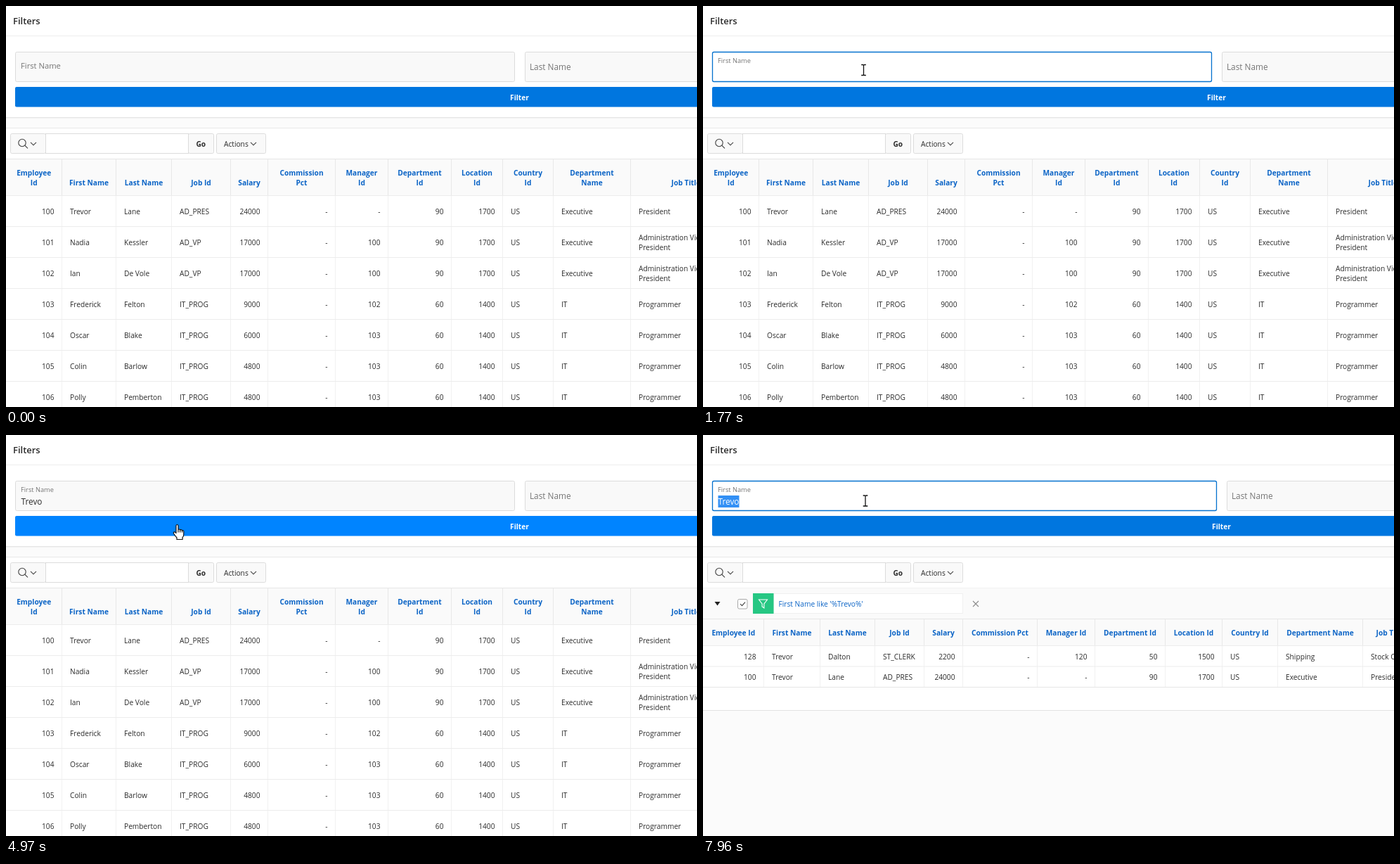
An HTML page for the animation above (8 s loop, 983 by 570 pixels).

```html
<!DOCTYPE html>
<html lang="en">
<head>
<meta charset="utf-8">
<title>Report filters</title>
<style>
  html, body { margin: 0; width: 100%; height: 100%; overflow: hidden; background: #fff; }
  svg { display: block; }
  text { font: 10.2px "Open Sans", "Noto Sans", sans-serif; fill: #2b2b2b; white-space: pre; }
  .bold { font-weight: 700; }
  .head { font-weight: 700; fill: #0b64c6; }
  .link { fill: #0b64c6; }
  .label { font-size: 11.8px; fill: #757575; }
  .value { font-size: 11.8px; }
  .icon { fill: none; stroke: #404040; stroke-width: 1.1; }
  .box { fill: #f9f9f9; stroke: #dcdcdc; }
</style>
</head>
<body>
<svg id="stage" width="983" height="570" viewBox="0 0 983 570"></svg>
<script>
const LOOP = 8000;
const RELOAD = 5750;
const WORD = "Trevo";
const KEY_TIMES = [2310, 2750, 2900, 3030, 3190];
const ALIGN = "RLLLRRRRRLLL";
const stage = document.getElementById("stage");

function add(parent, tag, attrs = {}, content = "") {
  const node = document.createElementNS("http://www.w3.org/2000/svg", tag);
  set(node, attrs);
  node.textContent = content;
  return parent.appendChild(node);
}
function set(node, attrs) {
  for (const name in attrs) node.setAttribute(name, attrs[name]);
}
const show = (node, on) => set(node, { visibility: on ? "visible" : "hidden" });
const group = parent => add(parent, "g");
const rect = (parent, x, y, width, height, attrs) =>
  add(parent, "rect", { x, y, width, height, ...attrs });
const path = (parent, d, attrs) => add(parent, "path", { d, ...attrs });
const line = (parent, d, stroke) => path(parent, d, { stroke, fill: "none" });
const label = (parent, x, y, content, cls = "", anchor = "start") =>
  add(parent, "text", { x, y, class: cls, "text-anchor": anchor }, content);

// Several lines of text, parted by "|"; y is the baseline of the last one.
function lines(parent, x, y, content, cls, anchor) {
  const parts = content.split("|");
  parts.forEach((part, i) =>
    label(parent, x, y - (parts.length - 1 - i) * 14.2, part, cls, anchor));
}

function table(parent, { edges, heads, top, headBottom, rowHeight, rows }) {
  const bottom = headBottom + rows.length * rowHeight;
  rect(parent, 0, top, 983, headBottom - top, { fill: "#fafafa" });
  line(parent, `M0 ${top}H983`, "#e6e6e6");
  edges.slice(0, -1).forEach(x => {
    line(parent, `M${x} ${top}V${headBottom}`, "#e8e8e8");
    line(parent, `M${x} ${headBottom}V${bottom}`, "#f1f1f1");
  });
  heads.forEach((head, i) => {
    const left = i ? edges[i - 1] : 0;
    lines(parent, (left + edges[i]) / 2, headBottom - 14.5, head, "head", "middle");
  });
  rows.forEach((row, r) => {
    const y = headBottom + r * rowHeight;
    const base = y + rowHeight / 2 + 4.5;
    line(parent, `M0 ${y}H983`, "#ececec");
    row.split(",").forEach((cell, i) => {
      const right = ALIGN[i] === "R";
      const x = right ? edges[i] - 11 : edges[i - 1] + 11.5;
      const drop = cell.includes("|") ? 7 : 0;
      lines(parent, x, base + drop, cell, "", right ? "end" : "start");
    });
  });
  line(parent, `M0 ${bottom}H983`, "#e6e6e6");
}

// Page frame
rect(stage, 0, 0, 983, 570, { fill: "#fff" });
label(stage, 10, 26, "Filters", "", "start").style.cssText = "font-size:13px;font-weight:600";
line(stage, "M0 42.5H983", "#eeeeee");
rect(stage, 0, 158, 983, 16, { fill: "#fbfbfb" });
line(stage, "M0 158.5H983", "#e4e4e4");
line(stage, "M0 159.5H983", "#f3f3f3");
line(stage, "M0 173.5H983", "#e8e8e8");

// Filter form
const field = rect(stage, 13.5, 65.5, 710, 42, { class: "box", rx: 2 });
const focusRing = rect(stage, 13.5, 65.5, 710, 42, { fill: "none", stroke: "#0572ce", rx: 2, "stroke-width": 1.3 });
const lastName = group(stage);
rect(lastName, 738.5, 65.5, 400, 42, { class: "box", rx: 2 });
label(lastName, 745, 90.7, "Last Name", "label");
const button = rect(stage, 13, 115, 1000, 28.5, { rx: 2 });
const buttonText = label(stage, 730.5, 133.7, "Filter", "bold", "middle");
buttonText.style.fill = "#fff";
const firstName = label(stage, 21, 90.7, "First Name", "label");
const selection = rect(stage, 21, 86, 30, 17, { fill: "#3390f5" });
const value = label(stage, 21.5, 98.6, "", "value");
const caret = rect(stage, 21, 86, 1, 16, { fill: "#111" });

// Toolbar
rect(stage, 6.5, 181.5, 50, 28, { class: "box", rx: 2 });
rect(stage, 56.5, 181.5, 203, 28, { fill: "#fff", stroke: "#dcdcdc" });
rect(stage, 259.5, 181.5, 36, 28, { class: "box", rx: 2 });
rect(stage, 299.5, 181.5, 70, 28, { class: "box", rx: 2 });
add(stage, "circle", { cx: 23, cy: 194.5, r: 5.2, class: "icon" });
path(stage, "M26.7 198.2L31 202.4M35 193.8l4 4 4-4M348 193.8l4 4 4-4", { class: "icon" });
label(stage, 277.3, 200, "Go", "bold", "middle");
label(stage, 310, 200, "Actions");

// Full report
const fullReport = group(stage);
table(fullReport, {
  edges: [79.5, 156.5, 235.5, 319.5, 372.5, 468.5, 543.5, 633.5, 706.5, 778.5, 888.5, 1046],
  heads: ["Employee|Id", "First Name", "Last Name", "Job Id", "Salary", "Commission|Pct",
    "Manager|Id", "Department|Id", "Location|Id", "Country|Id", "Department|Name", "Job Title"],
  top: 217.5, headBottom: 269.5, rowHeight: 44,
  rows: [
    "100,Trevor,Lane,AD_PRES,24000,-,-,90,1700,US,Executive,President",
    "101,Nadia,Kessler,AD_VP,17000,-,100,90,1700,US,Executive,Administration Vice|President",
    "102,Ian,De Vole,AD_VP,17000,-,100,90,1700,US,Executive,Administration Vice|President",
    "103,Frederick,Felton,IT_PROG,9000,-,102,60,1400,US,IT,Programmer",
    "104,Oscar,Blake,IT_PROG,6000,-,103,60,1400,US,IT,Programmer",
    "105,Colin,Barlow,IT_PROG,4800,-,103,60,1400,US,IT,Programmer",
    "106,Polly,Pemberton,IT_PROG,4800,-,103,60,1400,US,IT,Programmer"
  ]
});

// Filtered report
const filteredReport = group(stage);
rect(filteredReport, 0, 217, 983, 45, { fill: "#fafafa" });
line(filteredReport, "M0 217.5H983", "#f1f1f1");
path(filteredReport, "M16.5 237h8l-4 5.5z", { fill: "#222" });
rect(filteredReport, 49.5, 233.5, 13.5, 13.5, { fill: "#fff", stroke: "#a8a8a8", rx: 2 });
path(filteredReport, "M53 240.2l2.5 2.5 4.5-5", { class: "icon" });
rect(filteredReport, 100.5, 225.5, 269, 28, { fill: "#fff", stroke: "#f0f0f0" });
rect(filteredReport, 71, 225, 29.5, 29, { fill: "#26c783" });
path(filteredReport, "M79.5 234h12l-4.6 6v6l-2.8-2v-4z", { fill: "none", stroke: "#fff", "stroke-width": 1.1 });
label(filteredReport, 107.5, 244, `First Name like '%${WORD}%'`, "link");
path(filteredReport, "M384 236l8 8M392 236l-8 8", { stroke: "#8c8c8c", "stroke-width": 1.1 });
table(filteredReport, {
  edges: [86.5, 166.5, 244.5, 314.5, 369.5, 475.5, 557.5, 657.5, 738.5, 817.5, 938.5, 1018],
  heads: ["Employee Id", "First Name", "Last Name", "Job Id", "Salary", "Commission Pct",
    "Manager Id", "Department Id", "Location Id", "Country Id", "Department Name", "Job Title"],
  top: 261.5, headBottom: 299.5, rowHeight: 29.5,
  rows: [
    "128,Trevor,Dalton,ST_CLERK,2200,-,120,50,1500,US,Shipping,Stock Clerk",
    "100,Trevor,Lane,AD_PRES,24000,-,-,90,1700,US,Executive,President"
  ]
});
rect(filteredReport, 0, 391, 983, 179, { fill: "#fbfbfb" });
line(filteredReport, "M0 391.5H983", "#e2e2e2");

// Pointer
const pointer = group(stage);
const halo = add(pointer, "circle", { cx: -2, cy: -1, r: 13, fill: "#fff000", opacity: 0.6 });
const outline = { fill: "#fff", stroke: "#111", "stroke-width": 1.2, "stroke-linejoin": "round" };
const shapes = {
  beam: path(pointer, "M-3.3-7.5H-1.2Q0-7.5 0-6.3V6.3Q0 7.5-1.2 7.5H-3.3M3.3-7.5H1.2Q0-7.5 0-6.3M0 6.3Q0 7.5 1.2 7.5H3.3",
    { fill: "none", stroke: "#111", "stroke-width": 1.3 }),
  hand: path(pointer, "M-1.5 12V1.5Q-1.5 0 0 0T1.5 1.5V7Q3 5.8 4.2 7.4Q6 6.5 7 8.2Q9 7.6 9.3 9.6V14Q9.3 16.5 7.6 18V21H-.5V18.5Q-2.5 16.5-5 12.5Q-5.6 11-4.4 10.4Q-3 10-1.5 12ZM1.5 7V11M4.2 7.4V11M7 8.2V11",
    outline),
  arrow: path(pointer, "M0 0V16.5L3.8 13 6.3 18.8 8.7 17.7 6.2 12H11.5Z", outline)
};

// Steps: time, then values
const POINTER = [
  [0, 345, 600], [100, 345, 600], [1060, 225, 89], [1180, 225, 89], [1420, 228.5, 91],
  [3840, 228.5, 91], [4210, 249, 139.5], [4340, 243.5, 127.5], [6560, 243.5, 127.5],
  [6590, 243.5, 125], [7050, 230, 91], [7360, 230, 91], [7410, 230.5, 93],
  [7959, 230.5, 93], [7960, 231, 93.5]
];
const FLOAT = [[0, 0.22], [100, 0], [1170, 0], [1370, 1]];
const FOCUS = [[0, 0], [1170, 0], [1320, 1], [4750, 1], [4920, 0], [7560, 0], [7720, 1]];

function sample(steps, t) {
  const next = steps.findIndex(step => step[0] > t);
  if (next < 0) return steps[steps.length - 1].slice(1);
  const a = steps[next - 1], b = steps[next];
  const u = (t - a[0]) / (b[0] - a[0]);
  const k = u * u * (3 - 2 * u);
  return a.slice(1).map((v, i) => v + (b[i + 1] - v) * k);
}
const within = (t, ...spans) => spans.some(([from, to]) => t >= from && t < to);

function render(t) {
  const reloaded = t >= RELOAD;
  const shift = reloaded ? 7 : 0;
  show(fullReport, !reloaded);
  show(filteredReport, reloaded);
  set(lastName, { transform: `translate(${shift})` });
  set(buttonText, { x: 730.5 + shift });

  const active = within(t, [1110, 4750], [7560, LOOP]);
  set(field, { width: 710 + shift });
  field.style.fill = active ? "#fff" : "#f9f9f9";
  set(focusRing, { width: 710 + shift, opacity: sample(FOCUS, t)[0] });

  const [lift] = sample(FLOAT, t);
  set(firstName, { y: 90.7 - 9.8 * lift });
  firstName.style.fontSize = 11.8 - 2.55 * lift + "px";

  const typed = WORD.slice(0, KEY_TIMES.filter(k => k <= t).length);
  const selected = t >= 7680;
  if (value.textContent !== typed) value.textContent = typed;
  value.style.fill = selected ? "#fff" : "";
  const width = typed ? value.getComputedTextLength() : 0;
  show(selection, selected);
  set(selection, { x: 21.5, width });
  set(caret, { x: Math.round(21.3 + width) });
  show(caret, within(t, [1110, 1770], [2290, 3680], [7560, 7680]));

  const [x, y] = sample(POINTER, t);
  const overButton = y >= 115 && y < 144;
  const kind = overButton ? "hand" : y > 65 && y < 108 ? "beam" : "arrow";
  set(pointer, { transform: `translate(${x} ${y})` });
  for (const name in shapes) show(shapes[name], name === kind);
  show(halo, within(t, [1060, 1290], [4750, 4960], [7560, 7790]));
  set(button, { fill: overButton || within(t, [RELOAD, 7560]) ? "#0084ff" : "#0076df" });
}

function tick() {
  render(performance.now() % LOOP);
  requestAnimationFrame(tick);
}
tick();
</script>
</body>
</html>
```
